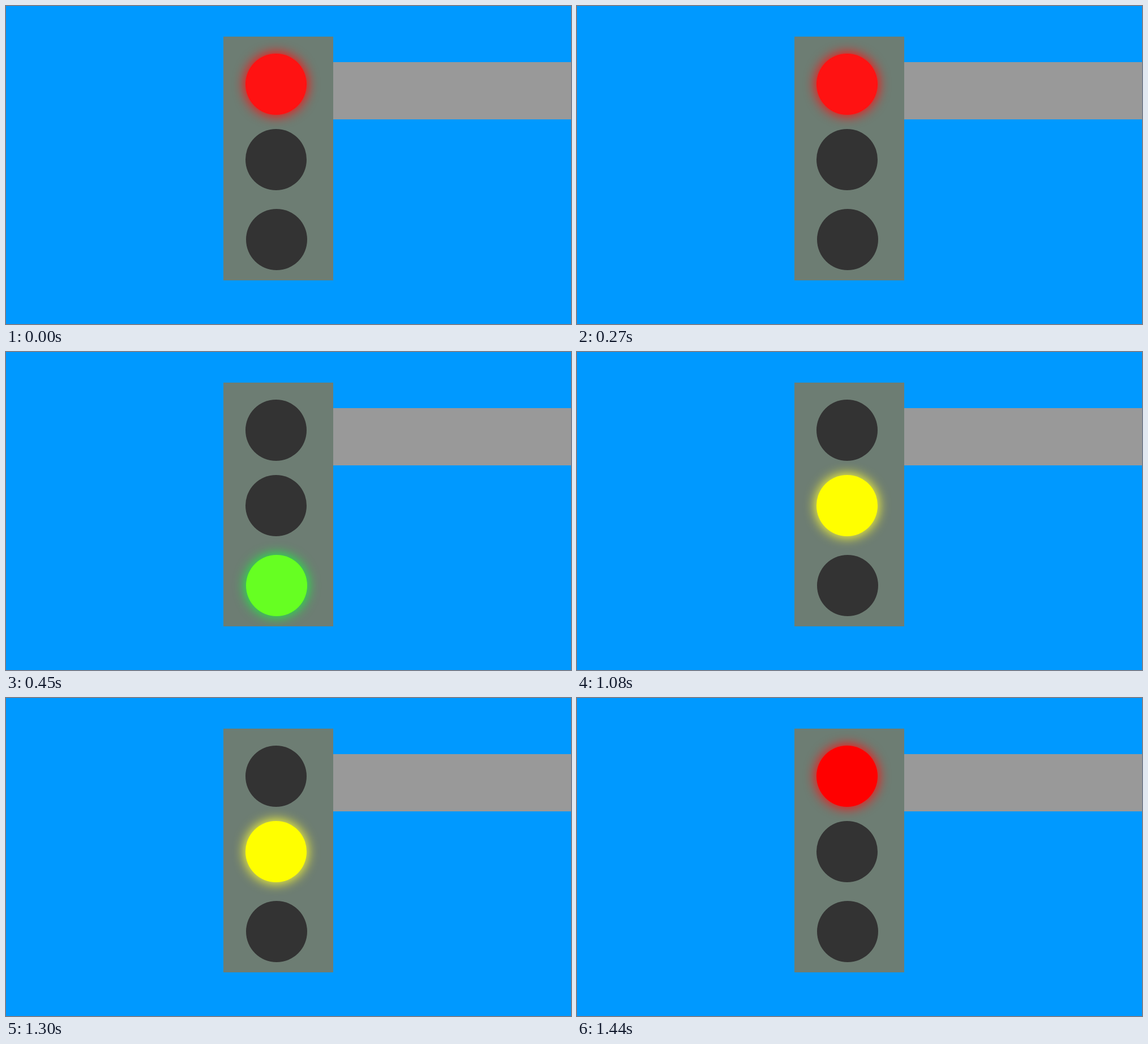
Recreate the animation shown at these times as an HTML page. Size 998 by 561 pixels, loop 1770 ms.

```html
<!DOCTYPE html>
<html lang="en">
<head>
<meta charset="utf-8">
<title>Traffic light</title>
<style>
  html, body { margin: 0; width: 100%; height: 100%; overflow: hidden; background: #09f; }
  div { position: absolute; }
  .arm { left: 577px; top: 98.5px; width: 421px; height: 101px; background: #999; }
  .box { left: 383.5px; top: 53.5px; width: 194px; height: 430.5px; background: #6d7d73; }
  .lamp { width: 108px; height: 108px; border-radius: 50%; background: #333; }
</style>
</head>
<body>
<div class="arm"></div>
<div class="box"></div>
<div class="lamp" style="left:423px; top:84px"></div>
<div class="lamp" style="left:423px; top:217px"></div>
<div class="lamp" style="left:424px; top:357.5px"></div>
<script>
const LOOP = 1770;
const lamps = document.querySelectorAll('.lamp');
const phases = [
  { end: 450, lamp: 0, color: '#ff1212', glow: '#f11' },
  { end: 1080, lamp: 2, color: '#66ff22', glow: '#2e4' },
  { end: 1440, lamp: 1, color: '#ffff00', glow: '#ff3' },
  { end: LOOP, lamp: 0, color: '#ff0000', glow: '#f11' }
];

function draw(now) {
  const time = now % LOOP;
  const phase = phases.find(p => time < p.end);
  lamps.forEach((lamp, i) => {
    const lit = i === phase.lamp;
    lamp.style.background = lit ? phase.color : '#333';
    lamp.style.boxShadow = lit ? `0 0 20px 2px ${phase.glow}` : 'none';
  });
}

const start = performance.now();
function tick() {
  draw(performance.now() - start);
  requestAnimationFrame(tick);
}
tick();
</script>
</body>
</html>
```
